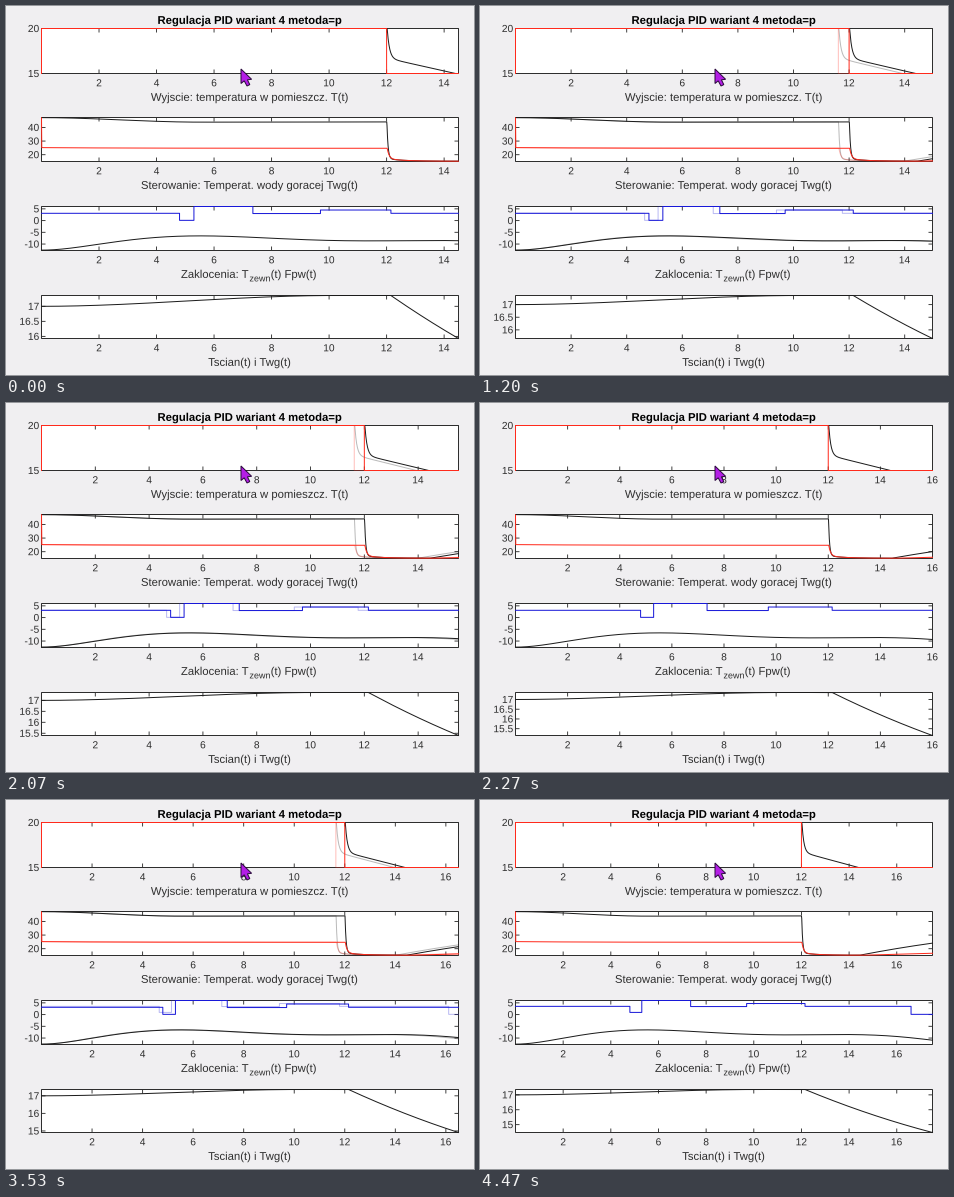
These frames come from a looping animation (468 px wide and 369 px high, 4.99 s). A matplotlib script:

```python
import numpy as np
import matplotlib.pyplot as plt
from matplotlib.animation import FuncAnimation
from matplotlib.patches import PathPatch, Polygon, Rectangle
from matplotlib.path import Path
from matplotlib.textpath import TextPath

W, H = 468, 369
LOOP, STEP = 4990, 10
LEFT, RIGHT = 35.5, 452.5
MID = 243.3
BOXES = [(22.5 + 89 * k, 67.5 + round(88.4 * k)) for k in range(4)]
INK, RED, BLUE, BLACK = "#2e2e2e", "#ff2a1c", "#1818d8", "#1c1c1c"
TICK_SIZE, LABEL_SIZE = 10.2, 11.3

# Each plot holds for HOLD ticks of 1/15 s, then the next one shows through.
TICKS, HOLD = [-2, 10, 23, 34, 45, 57, 67], 8
ENDS = 14.5 + 0.5 * np.arange(len(TICKS))

fig = plt.figure(figsize=(W / 72, H / 72), dpi=72, facecolor="#f0eff1")
ax = fig.add_axes([0, 0, 1, 1])
ax.set_xlim(0, W)
ax.set_ylim(H, 0)
ax.axis("off")


# ---- text -------------------------------------------------------------
def glyphs(text, x, y, size, align=0.5, bold=False):
    """Outline of text with its baseline at y; align 0 left, 1 right."""
    prop = {"family": "Liberation Sans", "weight": "bold" if bold else "normal"}
    tp = TextPath((0, 0), text, size=size, prop=prop)
    box = tp.get_extents()
    shift = x - box.x0 - align * box.width
    return Path(tp.vertices * [1, -1] + [shift, y], tp.codes)


def add_path(paths, z=4, **style):
    patch = PathPatch(Path.make_compound_path(*paths), zorder=z, snap=False, **style)
    return ax.add_patch(patch)


def add_text(paths, color=INK):
    return add_path(paths, facecolor=color, edgecolor="none", lw=0)


# ---- signals ----------------------------------------------------------
def ease(u):
    u = np.clip(u, 0, 1)
    return u * u * (3 - 2 * u)


def decay(t, start, tau):
    return np.exp(-np.maximum(t - start, 0) / tau)


def room_temp(t):
    after = 16.5 - 0.72 * (t - 12.3) + 3.3 * decay(t, 12.02, 0.08)
    return np.where(t < 12.02, 20, np.maximum(after, 15))


def supply_temp(t):
    before = 47.2 - 3.3 * ease(t / 5.5) + 0.03 * np.maximum(t - 7, 0)
    d = np.maximum(t - 14.45, 0)
    after = (15.2 + 27 * decay(t, 12.01, 0.04) + 1.8 * decay(t, 12.01, 0.6)
             + 3.4 * d - 0.16 * d * d)
    return np.where(t < 12.01, before, after)


def return_temp(t):
    before = 24.7 + 0.5 * np.exp(-t / 3)
    after = (15.2 + 7.7 * decay(t, 12.02, 0.07) + 1.8 * decay(t, 12.02, 0.6)
             + 0.5 * np.maximum(t - 14.6, 0))
    y = np.where(t < 12.02, before, after)
    y[0] = 47
    return y


OUTDOOR = np.polyfit([0, 2.3, 5.3, 8, 11, 14, 16, 17.5],
                     [-12.6, -9.5, -6.6, -7.4, -8.75, -8.4, -9.4, -10.9], 6)


def wall_temp(t):
    d = np.maximum(t - 12.15, 0)
    return 17 + 0.36 * ease(t / 10.2) - 0.662 * d + 0.0228 * d * d


def flow(end):
    edges = [0, 4.8, 5.3, 7.35, 9.7, 12.15, 16.6]
    levels = np.array([3.1, 0.1, 6, 3, 4.5, 3.1, 0.1])
    if end > edges[-1]:   # a new minimum rescales the earlier levels
        levels[:-1] = 6 - 0.86 * (6 - levels[:-1])
    n = sum(e < end for e in edges)
    x = np.repeat(edges[:n] + [end], 2)[1:-1]
    return x, np.repeat(levels[:n], 2)


# ---- one complete plot state -----------------------------------------
def build(end):
    t = np.linspace(0, end, 1500)
    wall = wall_temp(t)
    low = wall[-1]
    step = 0.5 if 17.36 - low < 2.3 else 1
    limits = [(15, 20), (15, 47.3), (-12.75, 6), (low, 17.36)]
    yticks = [[15, 20], [20, 30, 40], [-10, -5, 0, 5],
              np.arange(np.ceil(low / step) * step, 17.1, step)]

    def px(x):
        return LEFT + np.asarray(x) / end * (RIGHT - LEFT)

    def py(k, y):
        top, bottom = BOXES[k]
        lo, hi = limits[k]
        return np.clip(bottom - (np.asarray(y) - lo) / (hi - lo) * (bottom - top),
                       top, bottom)

    ticks, labels = [], []
    for k, (top, bottom) in enumerate(BOXES):
        for v in np.arange(2, end + 0.01, 2):
            x = px(v)
            ticks += [Path([(x, bottom), (x, bottom - 4)]), Path([(x, top), (x, top + 4)])]
            labels.append(glyphs(f"{v:g}", x, bottom + 12.8, TICK_SIZE))
        for v in yticks[k]:
            y = py(k, v)
            ticks += [Path([(LEFT, y), (LEFT + 4, y)]), Path([(RIGHT, y), (RIGHT - 4, y)])]
            labels.append(glyphs(f"{v:g}", 32.8, y + 3.5, TICK_SIZE, 1))
    group = [add_path(ticks, 2, facecolor="none", edgecolor=INK, lw=0.9),
             add_text(labels)]

    curves = [
        (0, t, room_temp(t), BLACK),
        (0, [0, 0, 12, 12, end], [15, 20, 20, 15, 15], RED),
        (1, t, supply_temp(t), BLACK),
        (1, t, return_temp(t), RED),
        (2, t, np.polyval(OUTDOOR, t), BLACK),
        (2, *flow(end), BLUE),
        (3, t, wall, BLACK),
    ]
    ghost = []
    for k, x, y, color in curves:
        style = dict(color=color, lw=1, snap=False)
        group += ax.plot(px(x), py(k, y), zorder=3, **style)
        if k < 3:
            ghost += ax.plot(px(x), py(k, y), zorder=2.5, alpha=0.3, **style)
    return group, ghost


# ---- fixed parts ------------------------------------------------------
for top, bottom in BOXES:
    ax.add_patch(Rectangle((LEFT, top), RIGHT - LEFT, bottom - top, snap=False,
                           facecolor="white", edgecolor=INK, lw=1, zorder=1))

add_text([glyphs("Regulacja PID wariant 4 metoda=p", MID + 0.5, 17.9, LABEL_SIZE,
                 bold=True)], "black")

base = [bottom + 27.4 for _, bottom in BOXES]
captions = [glyphs(text, MID, base[k], LABEL_SIZE) for k, text in (
    (0, "Wyjscie: temperatura w pomieszcz. T(t)"),
    (1, "Sterowanie: Temperat. wody goracej Twg(t)"),
    (3, "Tscian(t) i Twg(t)"))]
pen = 175.3
for text, drop, size in (("Zaklocenia: T", 0, LABEL_SIZE), ("zewn", 3.5, 9),
                         ("(t) Fpw(t)", 0, LABEL_SIZE)):
    part = glyphs(text, pen, base[2] + drop, size, 0)
    captions.append(part)
    pen = part.get_extents().x1 + 1.5
add_text(captions)

ax.add_patch(Polygon([(235, 63), (235, 77.5), (238.2, 74.8), (241, 80), (243.8, 78.6),
                      (241.4, 73.8), (245.6, 73.3)], closed=True, facecolor="#b41ee6",
                     edgecolor="#2a0a3c", lw=1, joinstyle="miter", zorder=6))

states = [build(end) for end in ENDS]


def at(tick):
    """Tick number to milliseconds on the 10 ms grid."""
    return STEP * round(tick * 1000 / 15 / STEP)


def show(artists, on):
    for a in artists:
        a.set_visible(on)


def update(i):
    ms = i * STEP
    now = sum(at(n) <= ms for n in TICKS) - 1
    fading = ms >= at(TICKS[now] + HOLD)
    for k, (group, ghost) in enumerate(states):
        show(group, k == now)
        show(ghost, fading and k == now + 1)
    return []


anim = FuncAnimation(fig, update, frames=LOOP // STEP, interval=STEP,
                     init_func=lambda: update(0), repeat=True, repeat_delay=0,
                     blit=False, cache_frame_data=False)
plt.show()
```
